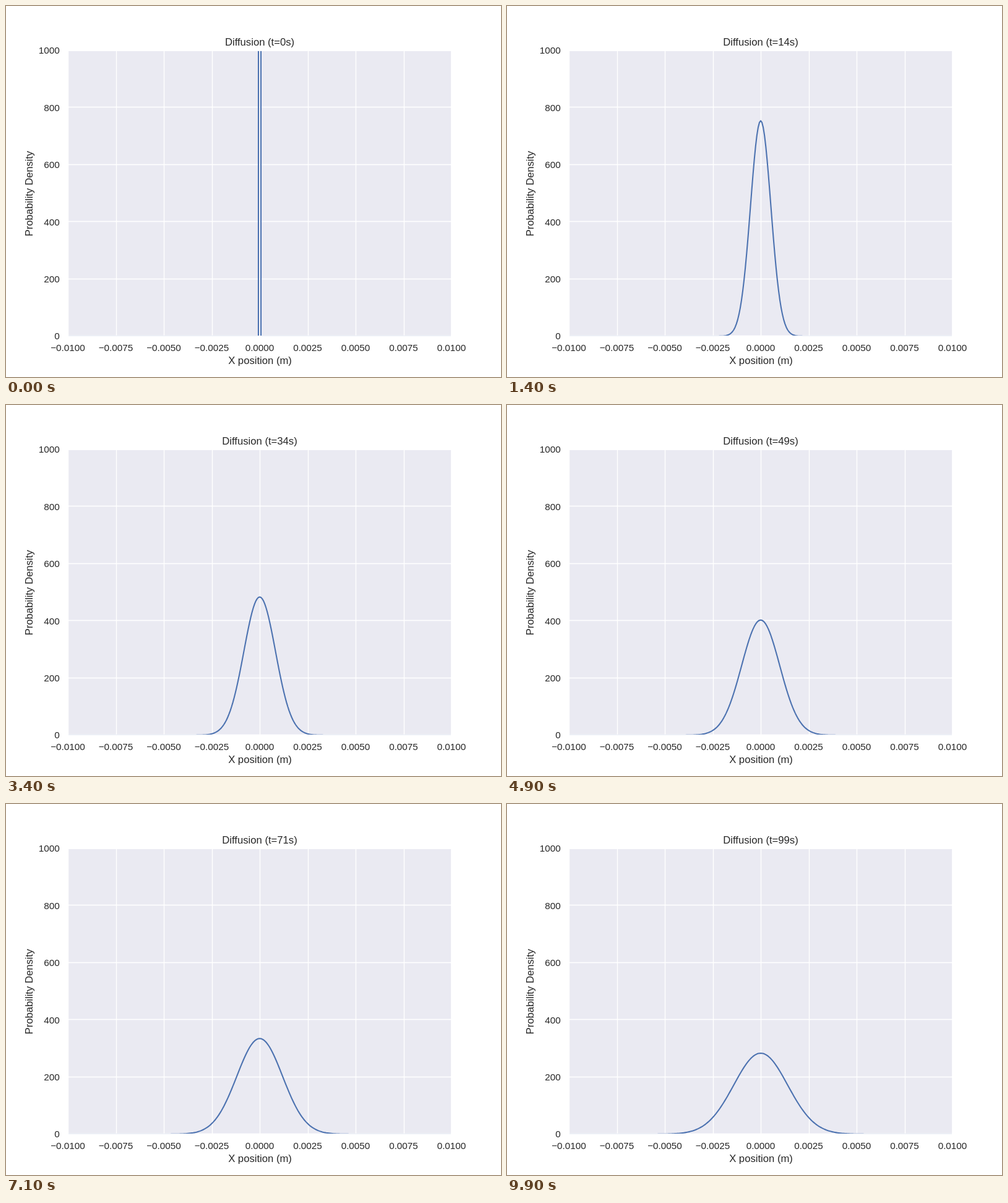
Write an HTML page with a canvas that moves like this. It is 800 px wide and 600 px high and loops after 10000 ms.

```html
<!DOCTYPE html>
<html lang="en">
<head>
<meta charset="utf-8">
<title>Diffusion</title>
<style>
  html, body { margin: 0; width: 100%; height: 100%; overflow: hidden; background: #fff; }
  canvas, svg { position: absolute; left: 0; top: 0; width: 800px; height: 600px; }
  text { font-family: "Liberation Sans", Arial, sans-serif; font-size: 16.67px; fill: #262626; text-anchor: middle; }
  .tick { font-size: 15.28px; }
  .end { text-anchor: end; }
</style>
</head>
<body>
<canvas id="plot" width="800" height="600"></canvas>
<svg id="labels" viewBox="0 0 800 600">
  <text id="title" x="410" y="64"></text>
  <text x="410.5" y="579">X position (m)</text>
  <text transform="translate(43.3 303.5) rotate(-90)">Probability Density</text>
</svg>
<script>
const ctx = document.getElementById("plot").getContext("2d");
const labels = document.getElementById("labels");
const title = document.getElementById("title");

const L = 100, R = 720, T = 72, B = 534;
const X_MAX = 0.01, Y_MAX = 1000;
const D = 1e-8;        // diffusion coefficient, m²/s
const SAMPLES = 301;
const STEP_MS = 100, STEPS = 100;

const px = x => L + (x + X_MAX) / (2 * X_MAX) * (R - L);
const py = y => B - y / Y_MAX * (B - T);
const snap = v => Math.floor(v + 0.5) + 0.5;

function addTick(str, x, y, cls) {
  const el = document.createElementNS("http://www.w3.org/2000/svg", "text");
  el.setAttribute("class", cls);
  el.setAttribute("x", x);
  el.setAttribute("y", y);
  el.textContent = str.replace("-", "\u2212");
  labels.appendChild(el);
}

const xTicks = Array.from({ length: 9 }, (_, i) => (i - 4) * 0.0025);
const yTicks = Array.from({ length: 6 }, (_, i) => i * 200);
xTicks.forEach(x => addTick(x.toFixed(4), px(x), 558, "tick"));
yTicks.forEach(y => addTick(String(y), 86.8, Math.round(py(y) + 5.4), "tick end"));

function line(x1, y1, x2, y2) {
  ctx.beginPath();
  ctx.moveTo(x1, y1);
  ctx.lineTo(x2, y2);
  ctx.stroke();
}

function drawGrid() {
  ctx.strokeStyle = "#fff";
  ctx.lineWidth = 1.39;
  for (const x of xTicks) line(snap(px(x)), T, snap(px(x)), B);
  for (const y of yTicks) {
    const gy = 600 - snap(600 - py(y));
    line(L, gy, R, gy);
  }
}

function drawCurve(sec) {
  const spread = 4 * D * Math.max(sec, 0.01);
  const peak = 1 / Math.sqrt(Math.PI * spread);
  ctx.beginPath();
  for (let i = 0; i < SAMPLES; i++) {
    const x = X_MAX * (2 * i / (SAMPLES - 1) - 1);
    ctx.lineTo(px(x), py(peak * Math.exp(-x * x / spread)));
  }
  ctx.strokeStyle = "#4c72b0";
  ctx.lineWidth = 2.08;
  ctx.lineJoin = "round";
  ctx.stroke();
}

function drawBorder() {
  ctx.strokeStyle = "#fff";
  ctx.lineWidth = 1.74;
  ctx.lineJoin = "miter";
  ctx.strokeRect(L, T, R - L, B - T);
}

function draw(sec) {
  ctx.fillStyle = "#fff";
  ctx.fillRect(0, 0, 800, 600);
  ctx.fillStyle = "#eaeaf2";
  ctx.fillRect(L, T, R - L, B - T);
  ctx.save();
  ctx.beginPath();
  ctx.rect(L, T, R - L, B - T);
  ctx.clip();
  drawGrid();
  drawCurve(sec);
  ctx.restore();
  drawBorder();
  title.textContent = `Diffusion (t=${sec}s)`;
}

const start = performance.now();
let shown = -1;

function tick() {
  const sec = Math.floor((performance.now() - start) / STEP_MS) % STEPS;
  if (sec !== shown) draw(shown = sec);
  requestAnimationFrame(tick);
}
tick();
</script>
</body>
</html>
```
